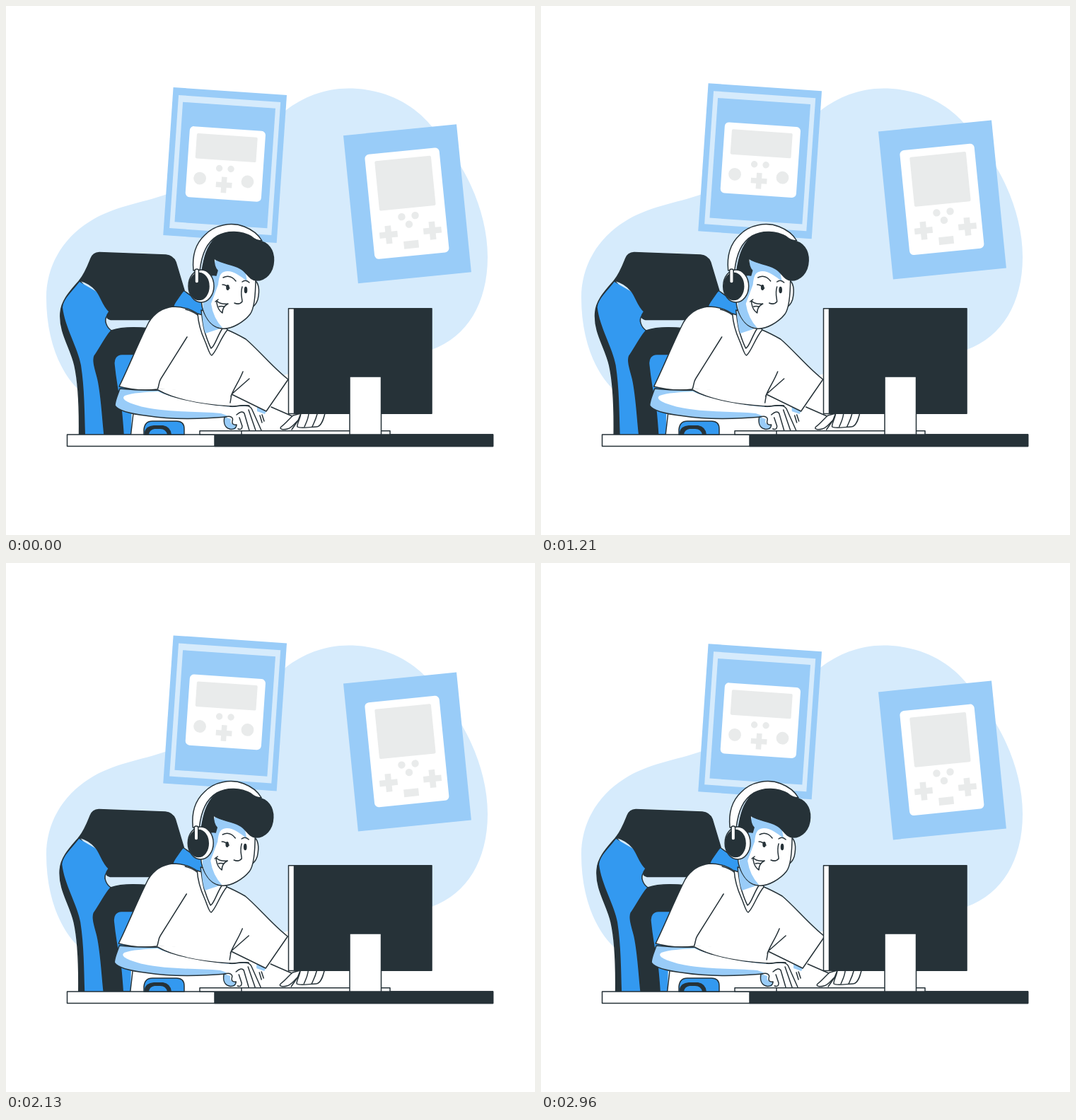
Recreate the animation shown at these times as an HTML page. Size 748 by 748 pixels, loop 3 s.

```html
<!DOCTYPE html>
<html lang="en">
<head>
<meta charset="utf-8">
<title>Player at the desk</title>
<style>
  html, body { margin: 0; height: 100%; overflow: hidden; background: #fff; }
  svg { display: block; width: 100vw; height: 100vh; }
  .pale { fill: #d6ebfc; }
  .soft { fill: #99ccf8; }
  .blue { fill: #3399f0; }
  .dark { fill: #263238; }
  .gray { fill: #e9ebeb; }
  .white { fill: #fff; }
  .none { fill: none; }
  .ink { stroke: #263238; stroke-width: 1.5; stroke-linecap: round; stroke-linejoin: round; }
</style>
</head>
<body>
<svg viewBox="0 0 748 748">
  <defs>
    <path id="cross" d="M-3.8-11.3h7.6v7.5h7.5v7.6h-7.5v7.5h-7.6v-7.5h-7.5v-7.6h7.5z"/>
  </defs>

  <path class="pale" d="M228 266C190 279 150 284 118 305C78 330 57 370 57 412C57 470 75 516 103 543C160 585 300 550 400 520C470 510 545 508 602 486C652 468 681 420 681 355C681 312 667 268 645 230C634 207 618 186 600 168C575 138 535 116.600 484 116.600C450 116.600 420 129 395 148C370 190 310 245 228 266Z"/>

  <g id="posters">
    <g transform="translate(236.6 115) rotate(3.93)">
      <rect class="soft" width="160.8" height="209.5"/>
      <rect class="pale" x="8.2" y="10.5" width="144.5" height="188.5"/>
      <rect class="soft" x="14.9" y="19.8" width="131.2" height="170"/>
      <rect class="white" x="27.3" y="53" width="107.4" height="100.3" rx="6"/>
      <g class="gray">
        <rect x="37.8" y="62.5" width="86" height="35.5" rx="2"/>
        <circle cx="72.7" cy="109.8" r="4.7"/>
        <circle cx="89.2" cy="109.7" r="4.7"/>
        <circle cx="46.2" cy="125.7" r="8.9"/>
        <circle cx="113.8" cy="126" r="8.9"/>
        <use href="#cross" x="80.8" y="132.8"/>
      </g>
    </g>
    <g transform="translate(477 183.2) rotate(-5.71)">
      <rect class="soft" width="160.8" height="210"/>
      <rect class="white" x="27" y="30" width="105.8" height="148.7" rx="6"/>
      <g class="gray">
        <rect x="40.3" y="40.6" width="80" height="70.5" rx="2"/>
        <circle cx="70.6" cy="122.6" r="5.2"/>
        <circle cx="89.8" cy="122.5" r="5.2"/>
        <circle cx="80" cy="134.1" r="5.2"/>
        <use href="#cross" transform="translate(49.7 145.9) scale(1.13)"/>
        <use href="#cross" transform="translate(112 146.2) scale(1.13)"/>
        <rect x="69.8" y="157.5" width="21" height="10.8"/>
      </g>
    </g>
  </g>

  <g id="player">
    <!-- chair -->
    <path class="dark ink" d="M104 388C92 402 78 416 77 434C75 462 91 482 97 508C103 535 104 565 103.500 606H142L150 440Z"/>
    <path class="blue" d="M104 390C94 403 81 414 80 426C83 454 102 484 106 508C111 540 111 575 112 606H142L151 475L149 458L140 446L146 432L130 405Z"/>
    <path class="pale" d="M145 436C138 441 140 452 149 459L165 456H205V444H147Z"/>
    <path class="blue ink" d="M251 402C259 408 268 415 280 420V438L230 432Z"/>
    <path class="dark ink" d="M104 388C112 378 116 367 120 357Q123 349 132 348.500L226 352Q236 353 240 362L252 402C244 407 239 416 234 432L212 443.500H148Q141 442 143 437L146 432C137 424 134 410 128 403C121 394 112 390 104 388Z"/>
    <path class="none ink" d="M143 438C138 444 142 454 149 459"/>
    <path class="dark ink" d="M205 456C185 454 162 454 149 459C143 464 134 482 125 495C122 502 127 516 130 528C135 551 136 578 139 606H185V500Z"/>
    <path class="blue ink" d="M190 492.500H165C156 492 152 499 153 507C155 528 159 550 163 570Q165 590 166 606H190Z"/>

    <!-- far arm -->
    <path class="white" d="M320 550L367 573L374 566L407 578L392 599H330V575Z"/>
    <path class="soft" d="M319 550L368 573L366 577C350 571 335 566 317 562Z"/>
    <path class="none ink" d="M375 567L407 581"/>
    <path class="white ink" d="M406 579C400 584 396 590 389 595C386 598 391 600 398 598C405 596 408 590 413 586L417 576Z"/>
    <path class="white ink" d="M417 576C416 584 411 591 412 595C416 598 431 595 439 595C446 595 449 584 451 576Z"/>
    <path class="none ink" d="M413 586L404 599M428 577C427 585 424 590 422 595M440 577C438 585 435 590 433 595"/>

    <!-- torso -->
    <path class="white" d="M178 560L177 606H355V560L319 549L335 500L220 500Z"/>
    <path class="none ink" d="M180 576L176.500 606"/>
    <path class="white ink" d="M272 436C261 428 248 425 236 425C220 427 210 434 202 447C188 474 173 512 160 538C178 543 198 544 214 542L319 549L368 573L399 528C376 510 356 485 339 471Q325 463 313 458L290 470Z"/>
    <path class="white" d="M213 541L319 546L320 572L215 552Z"/>
    <path class="none ink" d="M214 542C217 538 215 533 219 527L256 468M335 517C330 530 322 541 318 552M344 527L319 549L317 561M254 429Q265 432 271 437"/>

    <!-- neck -->
    <path class="white ink" d="M271 435C272 449 276 462 281 473C285 482 288 494 291 494C298 488 303 470 313 458L306 445Z"/>
    <path class="white ink" d="M276 430C278 446 279 456 282 464Q287 479 290 484C295 482 299 466 306 456L308 440Z"/>
    <path class="soft" d="M277 432C278 446 279 455 282 463Q291 460 303 456L300 438Z"/>

    <!-- near arm -->
    <path class="soft ink" d="M161 541C158 550 154 558 154 565C159 573 178 577 200 579.500C236 585 276 584 312 581L344 565C330 564 324 567 317 566C284 564 241 558 215 543Q190 544 161 541Z"/>
    <path class="white" d="M215 545C198 546 178 547 168 551C160 557 179 563 194 567C230 575 273 573 304 576L318 581L340 566.500C328 565 325 568 318 567C286 565 240 557 215 545Z"/>
    <path class="white" d="M312 580L322 567L343 566L350 573L361 600H320Q308 596 312 580Z"/>
    <path class="soft" d="M309 581C306 590 310 598 318 599H324Q327 595 324 592Q316 592 318 584Z"/>
    <path class="none ink" d="M309 581C307 590 310 596 316 598C322 600 326 596 326 592M310 581C318 579 322 582 320 587Q319 593 326 592M317 566C325 567 331 564 340 565Q347 566 349 573L361 600M343 571L353 600M326 578Q334 571 337 576L344 600M330 582L334 594Q334 600 328 598M359 579L362 589M362 578L365 587"/>

    <!-- head -->
    <path class="white ink" d="M349 387C358 389 359 402 356 415Q353 424 346 427Z"/>
    <path class="white ink" d="M290 350C281 378 273 413 278 428C283 444 293 455 305 456C319 458 337 446 345 436C352 427 353 405 353 384L335 350Z"/>
    <path class="soft" d="M296 358C294 372 276 408 279 428C283 444 293 455 306 455Q293 441 290 421L300 394C301 385 302 378 308 376C319 372 331 382 341 389L337 369Z"/>
    <path class="dark ink" d="M277 375C280 356 284 340 296 328C309 316 333 319 348 327Q352 331 357 332C371 334 379 345 378.500 360C378 377 367 388 354 388C343 387 341 376 331 371C318 364 306 365 294 357C294 367 296 371 299 374L297 381C289 379 288 384 285 379Z"/>
    <path class="white ink" d="M265 374C263 354 267 337 281 324C295 309 319 305 337 312C350 317 358 325 362 332C355 332 352 330 347 326C333 318 313 317 299 325C284 334 277 350 274 374Z"/>
    <ellipse class="white ink" cx="276" cy="396" rx="18" ry="23"/>
    <ellipse class="dark ink" cx="273" cy="396.500" rx="14" ry="19"/>
    <rect class="white ink" x="267" y="372" width="5.500" height="20" rx="2.500"/>
    <path class="none ink" d="M307 384Q317 379 325 389M306 394Q311 394 316 399M334 390Q339 386 344 391M334 397C331 407 334 413 334 418Q330 423 323 420"/>
    <ellipse class="dark" cx="313.500" cy="398" rx="2.300" ry="4"/>
    <ellipse class="dark" cx="339" cy="401.500" rx="2.300" ry="4.800"/>
    <path class="white ink" d="M298 417C302 421 307 422 314 421C308 424 306 428 306 434C301 431 299 426 298 420Z"/>
    <path class="none ink" d="M296 418L300 415M301 425Q305 424 308 425"/>
  </g>

  <!-- desk -->
  <rect class="white ink" x="86.500" y="606" width="602" height="16.500"/>
  <rect class="dark ink" x="295" y="606" width="393.500" height="16.500"/>
  <path class="blue ink" d="M195 606V599Q196 587 207 587H241Q252 587 252 598V606Z"/>
  <path class="dark" d="M196 606V602C198 595 204 593 212 593H222Q233 595 234 606H228Q226 598 218 598H210Q203 599 202 606Z"/>
  <rect class="white ink" x="274" y="600.800" width="269" height="5.200"/>
  <path class="none ink" d="M333 601V606"/>
  <rect class="white ink" x="399.500" y="427.700" width="9" height="148.800"/>
  <rect class="dark ink" x="407.500" y="427.700" width="194.500" height="148.500"/>
  <rect class="white ink" x="486" y="524" width="44.500" height="82"/>
</svg>
<script>
  const unit = 1.496, loop = 3000, floatTime = 1500, shakeStart = 500;
  const shake = [0, -1, 2, -4, 4, -4, 4, -4, 2, -1, 0];
  const posters = document.getElementById('posters');
  const player = document.getElementById('player');

  // Linear interpolation between evenly spaced shake positions.
  function shakeAt(ms) {
    const p = Math.max(0, ms - shakeStart) / loop * 10;
    const i = Math.floor(p);
    return shake[i] + (shake[i + 1] - shake[i]) * (p - i);
  }

  function draw(now) {
    const t = now % loop;
    const rise = 1 - Math.abs(1 - 2 * (t % floatTime) / floatTime);
    posters.setAttribute('transform', `translate(0 ${-10 * unit * rise})`);
    player.setAttribute('transform', `translate(${unit * shakeAt(t)} 0)`);
    requestAnimationFrame(() => draw(performance.now() - start));
  }

  const start = performance.now();
  draw(0);
</script>
</body>
</html>
```
